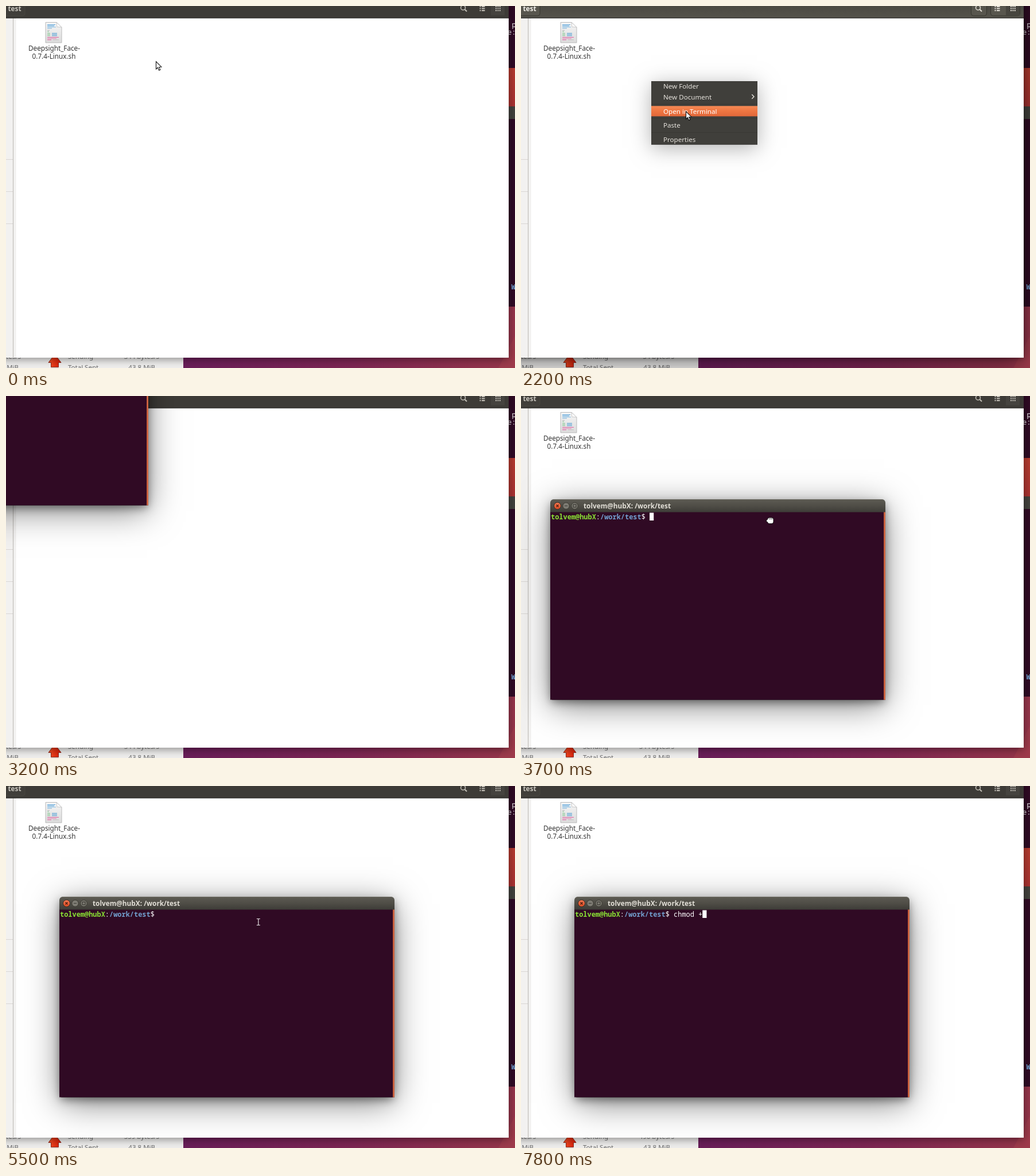
Animation of 887x631 px, one loop 8000 ms. Source, as an HTML page with a canvas:

```html
<!DOCTYPE html>
<html lang="en">
<head>
<meta charset="utf-8">
<title>Open in Terminal</title>
<style>
html, body { margin: 0; width: 100%; height: 100%; overflow: hidden; background: #300a24; }
canvas { display: block; }
</style>
</head>
<body>
<canvas id="stage" width="887" height="631"></canvas>
<script>
const ctx = document.getElementById('stage').getContext('2d');
const SANS = '"Noto Sans", "Open Sans", sans-serif';
const MONO = '"Noto Sans Mono", "DejaVu Sans Mono", monospace';
const CELL = 7.17, LOOP = 8000;
const USER = 'tolvem@hubX', DIR = '/work/test';

// Value of the last [time, value] entry that has begun
const at = (steps, t) => steps.filter(s => s[0] <= t).pop()[1];

function rect(x, y, w, h, fill) {
  ctx.fillStyle = fill;
  ctx.fillRect(x, y, w, h);
}

function text(str, x, y, color, font = '11.6px ' + SANS, align = 'left') {
  ctx.font = font;
  ctx.textAlign = align;
  ctx.fillStyle = color;
  ctx.fillText(str, x, y);
}

function fade(x0, y0, x1, y1, ...colors) {
  const g = ctx.createLinearGradient(x0, y0, x1, y1);
  colors.forEach((c, i) => g.addColorStop(i / (colors.length - 1), c));
  return g;
}

function shape(points, fill, stroke, width = 1) {
  ctx.beginPath();
  points.forEach(p => ctx.lineTo(...p));
  ctx.closePath();
  ctx.fillStyle = fill;
  ctx.fill();
  if (stroke) {
    ctx.strokeStyle = stroke;
    ctx.lineWidth = width;
    ctx.stroke();
  }
}

function lines(color, width, ...paths) {
  ctx.strokeStyle = color;
  ctx.lineWidth = width;
  ctx.beginPath();
  for (const [first, ...rest] of paths) {
    ctx.moveTo(...first);
    rest.forEach(p => ctx.lineTo(...p));
  }
  ctx.stroke();
}

function disc(x, y, r, fill, stroke) {
  ctx.beginPath();
  ctx.arc(x, y, r, 0, 7);
  if (fill) { ctx.fillStyle = fill; ctx.fill(); }
  if (stroke) { ctx.strokeStyle = stroke; ctx.stroke(); }
}

function shadow(x, y, w, h, blur, dy, alpha) {
  ctx.save();
  ctx.shadowColor = `rgba(0,0,0,${alpha})`;
  ctx.shadowBlur = blur;
  ctx.shadowOffsetY = dy;
  rect(x, y, w, h, '#000');
  ctx.restore();
}

function desktop(t) {
  rect(300, 524, 587, 107, fade(309, 0, 887, 0, '#691d59', '#7c2553', '#96354a'));
  shape([[858, 631], [887, 575], [887, 631]], 'rgba(190,80,80,.2)');
  rect(870, 0, 17, 108, '#2f0a24');
  rect(870, 108, 17, 67, fade(0, 108, 0, 175, '#b63c2f', '#a93331'));
  rect(870, 175, 17, 22, '#43423d');
  rect(870, 197, 17, 327, '#300a24');
  const mono = '11.95px ' + MONO;
  text('p', 881.5, 37, '#fff', mono);
  text('e:', 874, 50, '#e8e4e6', mono);
  text('W', 880.5, 494, '#729fcf', 'bold ' + mono);

  rect(0, 600, 309, 31, '#f0efee');
  const rate = at([[0, '344'], [300, '589'], [1200, '54'], [3000, '544'],
    [4700, '618'], [5500, '559'], [6500, '602'], [7300, '496']], t);
  const row = (str, x, y, align) => text(str, x, y, '#6a6a6a', '11.5px ' + SANS, align);
  row('bytes/s', 26, 615, 'right');
  row('MiB', 22, 634, 'right');
  row('Sending', 108, 615);
  row('Total Sent', 108, 634);
  row(rate + ' bytes/s', 267, 615, 'right');
  row('43.8 MiB', 260, 634, 'right');
  shape([[85, 607], [96, 621.5], [91.5, 621.5], [91.5, 629.5], [78.5, 629.5], [78.5, 621.5], [74, 621.5]],
    fade(76, 0, 94, 0, '#f04a22', '#d81e08'), '#8a2a1c');
}

function fileIcon() {
  shape([[69, 28.5], [88, 28.5], [97, 37], [97, 64], [69, 64]],
    fade(0, 28, 0, 64, '#f6f6f6', '#dcdcdc'), '#b4b4b4', .9);
  shape([[88, 28.5], [97, 37], [89, 36.5]], '#fff', '#bdbdbd', .8);
  const dash = (x, y, w, c) => rect(x, y, w, 1.1, c);
  [[14, '#5aa5dc'], [12, '#5aa5dc'], [15, '#8cc0e4'], [8, '#7fb5dd']]
    .forEach(([w, c], i) => dash(72, 32 + i * 2.1, w, c));
  dash(72, 42, 4, '#b9b9b9');
  dash(72, 44.2, 3, '#8fca9b');
  for (let i = 0; i < 3; i++) {
    dash(72, 47 + i * 2.1, 5, '#8fca9b');
    dash(80, 47 + i * 2.1, 9, '#62a6d6');
  }
  dash(72, 54, 20, '#e06aa5');
  dash(72, 56.2, 16, '#e58ab8');
  dash(72, 58.4, 7, '#e06aa5');
  dash(82, 58.4, 10, '#c4c4c4');
}

function fileManager(t) {
  const active = t >= 1700 && t < 3000;
  const lit = t >= 1800 && t < 3000;
  if (active) {
    shadow(-60, -60, 936, 673, 40, 8, .5);
    shadow(-60, -60, 936, 673, 8, 2, .3);
  } else {
    shadow(-60, -60, 936, 673, 14, 3, .42);
  }
  rect(0, 0, 876, 613, '#fff');
  rect(0, 21, 17.5, 592, '#f2f1f0');
  rect(12, 21, 1, 592, '#bab7b3');
  for (const y of [267, 323, 379]) rect(0, y, 12, 1, '#d9d6d3');

  rect(0, 0, 876, 21, lit ? fade(0, 0, 0, 21, '#4b4943', '#55534b') : '#3d3b37');
  rect(0, 20, 876, 1.5, '#2b2a27');
  const edge = lit ? '#37362f' : '#484641';
  ctx.lineWidth = 1;
  ctx.strokeStyle = edge;
  ctx.fillStyle = lit ? '#58564e' : '#403e3a';
  for (const [x, w] of [[-6, 39], [784.5, 27], [818.5, 51]]) {
    ctx.beginPath();
    ctx.roundRect(x, -8, w, 25, 4);
    if (lit || x < 0) ctx.fill();
    if (lit || x < 800 && x < 0) ctx.stroke();
  }
  rect(845, 0, 24, 16.5, lit ? '#47453f' : '#45433f');
  const ink = lit ? '#e4e0d8' : '#c4c1b9';
  text('test', 3.5, 9, lit ? '#f3f0ea' : '#c9c6be', 'bold 11.8px ' + SANS);
  ctx.lineWidth = 1.5;
  disc(796.5, 3, 4, null, ink);
  lines(ink, 2, [[799.5, 6], [803, 9.5]]);
  for (let i = 0; i < 3; i++) {
    const y = i * 3.5;
    rect(825.5, y, 2, 2, ink);
    rect(829, y, 5.5, 2, ink);
    for (let j = 0; j < 3; j++) rect(853 + j * 3.4, y, 2, 2, ink);
  }

  fileIcon();
  text('Deepsight_Face-', 84, 78, '#333', '11.7px ' + SANS, 'center');
  text('0.7.4-Linux.sh', 83.5, 92, '#333', '11.7px ' + SANS, 'center');
}

function menu(t, [, py]) {
  const [x, y, w, h] = [227, 131, 185, 110.5];
  shadow(x, y, w, h, 34, 6, .3);
  if (t < 1800) return rect(x, y, w, h, '#fff');
  rect(x, y, w, h, '#403f3b');
  for (const sy of [170.5, 195.5, 220]) rect(x, sy, w, 1, '#393834');
  const rows = [['New Folder', 131], ['New Document', 149.5], ['Open in Terminal', 174.3],
    ['Paste', 199], ['Properties', 223.5]];
  for (const [label, top] of rows) {
    const hot = py >= top && py < top + 18.3;
    if (hot) rect(x, top, w, 18, fade(0, top, 0, top + 18, '#f68a55', '#ee7541', '#e2683a'));
    text(label, 248, top + 13.4, hot ? '#fff' : '#e6e3dd');
  }
  lines('#e6e3dd', 1.4, [[402.3, 154.3], [406, 158], [402.3, 161.7]]);
}

function terminal(t) {
  const [x, y] = at([[3000, [-336, -290]], [3200, [-336, -159]], [3700, [51, 180]],
    [4000, [95, 196]], [4200, [93, 193]]], t);
  const w = 584, h = 349.5;
  shadow(x + 3, y + 4, w - 6, h - 4, 56, 9, .5);
  shadow(x + 2, y + 4, w - 4, h - 5, 16, 4, .5);
  rect(x, y + 22, w, h - 22, '#300a24');
  rect(x + w - 3, y + 22, 3, h - 22, fade(x + w - 3, 0, x + w, 0, '#a8503c', '#d9693f', '#b85a45'));
  ctx.beginPath();
  ctx.roundRect(x, y, w, 22.5, [6, 6, 0, 0]);
  ctx.fillStyle = fade(0, y, 0, y + 22, '#5d5b53', '#504e47', '#3e3d38');
  ctx.fill();
  rect(x + 5, y, w - 10, 1, '#6b6960');

  const by = y + 11.5;
  ctx.lineWidth = 1;
  disc(x + 12.5, by, 6, fade(0, by - 6, 0, by + 6, '#f27a54', '#dd4a22'), '#3a2a22');
  disc(x + 27.5, by, 5.7, '#7d7b73', '#38372f');
  disc(x + 42.5, by, 5.7, '#7d7b73', '#38372f');
  const bx = x + 12.5;
  lines('#4a1c10', 1.2, [[bx - 2, by - 2], [bx + 2, by + 2]], [[bx + 2, by - 2], [bx - 2, by + 2]]);
  lines('#3b3a34', 1.2, [[x + 25, by], [x + 30, by]],
    [[x + 40, by - 2.3], [x + 45, by - 2.3], [x + 45, by + 2.3], [x + 40, by + 2.3], [x + 40, by - 2.8]]);
  text(`${USER}: ${DIR}`, x + 58, y + 16, '#e2dfd7', 'bold 11.8px ' + SANS);
  if (t < 3700) return;

  const typed = 'chmod +'.slice(0, at([[0, 0], [6800, 2], [7000, 4], [7300, 6], [7800, 7]], t));
  let col = 0;
  const put = (str, color, weight = 'bold ') => {
    text(str, x + 1 + col * CELL, y + 34.5, color, weight + '11.95px ' + MONO);
    col += str.length;
  };
  put(USER, '#8ae234');
  put(':', '#fff', '');
  put(DIR, '#729fcf');
  put('$ ', '#fff', '');
  put(typed, '#fff', '');
  if (at([[0, 1], [4700, 0], [5000, 1], [5500, 0], [6300, 1]], t))
    rect(x + 1 + col * CELL, y + 23.5, 7.2, 13.5, '#fff');
}

// Arrow tip, moved in 100 ms steps
function pointer(t) {
  const step = (from, n) => Math.min(1, Math.max(0, (Math.floor(t / 100) - from) / n));
  const a = step(9, 5), b = step(17, 5);
  return [261 - 35 * a + 61 * b, 96 + 33 * a + 54 * b];
}

function arrow([x, y]) {
  const pts = [[0, 0], [0, 13.2], [3, 10.5], [5, 15.3], [7.3, 14.3], [5.3, 9.6], [9.3, 9.4]];
  shape(pts.map(p => [x + .5 + p[0], y + .8 + p[1]]), '#fff', '#111', 1.1);
}

function fist([x, y]) {
  ctx.beginPath();
  ctx.roundRect(x - 4, y - 4.5, 9.5, 9.5, 3);
  ctx.roundRect(x - 6, y - 1.5, 5, 4, 2);
  ctx.strokeStyle = '#111';
  ctx.lineWidth = 1.6;
  ctx.stroke();
  ctx.fillStyle = '#fff';
  ctx.fill();
  lines('#333', .8, ...[-1.3, 1, 3.2].map(d => [[x + d, y - 4], [x + d, y - 1.5]]));
}

function iBeam(x, y) {
  lines('#e9e4e7', 1.2, [[x, y - 5], [x, y + 5]],
    [[x - 3, y - 5.5], [x + 3, y - 5.5]], [[x - 3, y + 5.5], [x + 3, y + 5.5]]);
}

function draw(t) {
  desktop(t);
  fileManager(t);
  const tip = pointer(t);
  if (t >= 1700 && t < 2500) menu(t, tip);
  if (t >= 3000) terminal(t);
  if (t < 3000) arrow(tip);
  else if (t >= 3700 && t < 4700) fist(at([[3700, [434, 217]], [4000, [436, 208]], [4200, [434, 205]]], t));
  else if (t >= 4700 && t < 6500) iBeam(439.8, 237);
}

function frame() {
  draw(performance.now() % LOOP);
  requestAnimationFrame(frame);
}
frame();
</script>
</body>
</html>
```
